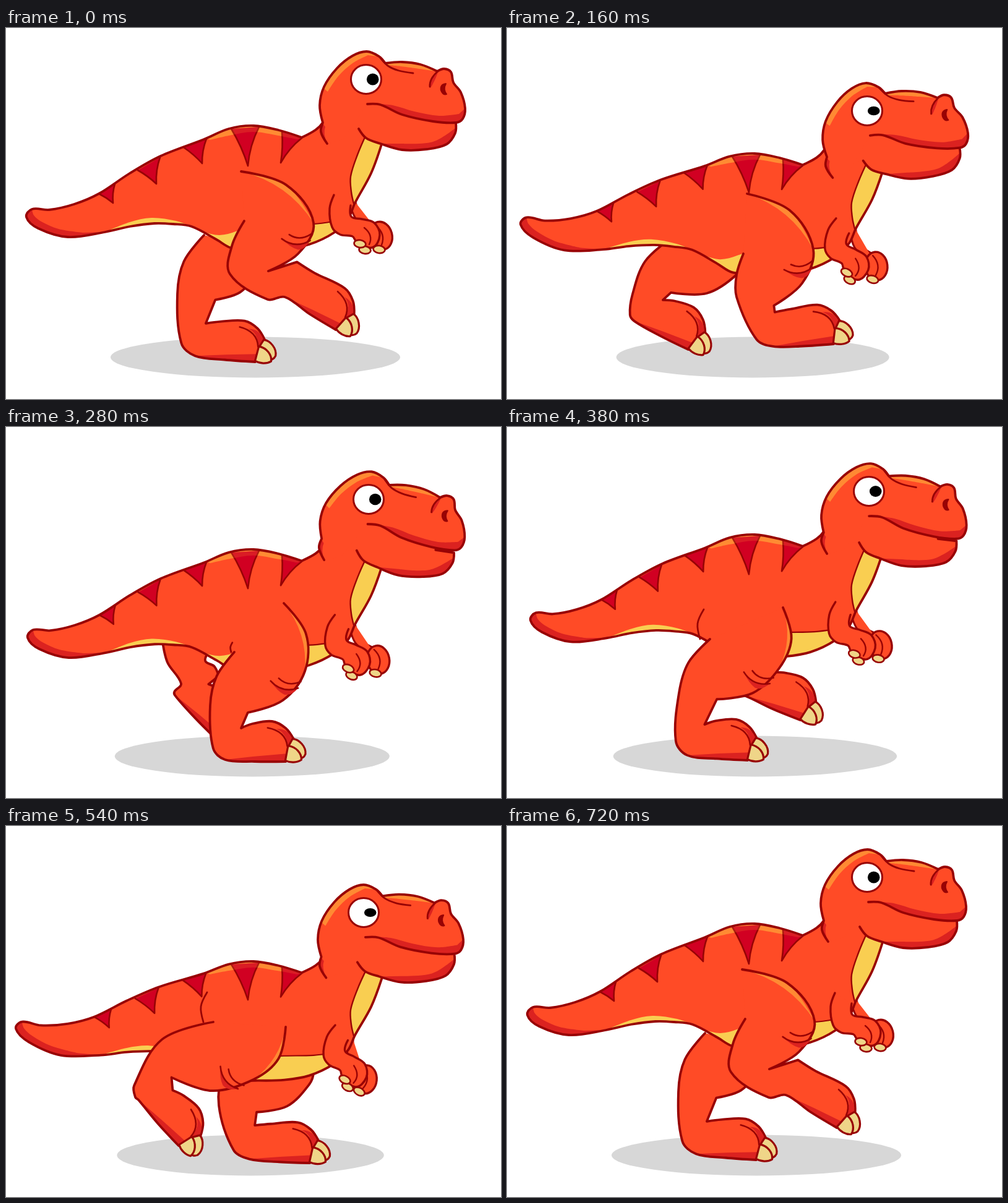
Animation, 800 px wide and 600 px high, one loop 740 ms. Source, as an HTML page with a canvas:

```html
<!DOCTYPE html>
<html lang="en">
<head>
<meta charset="utf-8">
<title>Running dinosaur</title>
<style>
html, body { margin: 0; width: 100%; height: 100%; overflow: hidden; background: #fff; }
canvas { display: block; width: 800px; height: 600px; }
</style>
</head>
<body>
<canvas id="stage" width="800" height="600"></canvas>
<script>
const ctx = document.getElementById('stage').getContext('2d');
const SKIN = '#ff4b26', LINE = '#980305', SHADE = '#db2220', GLOW = '#ff8a33',
      STRIPE = '#d10022', BELLY = '#f9ce51', CLAW = '#efd588';

// The run repeats every CYCLE ms and is shown in steps of STEP ms
const LOOP = 740, CYCLE = 720, STEP = 20;
const KEYS = [0, 160, 280, 380, 540, 620];

const nums = s => s.split(/[ ,]+/).map(Number);
const pts = s => s.split(' ').map(nums);
const rad = deg => deg * Math.PI / 180;
const clamp = (v, lo, hi) => Math.min(hi, Math.max(lo, v));
const add = ([x, y], dx, dy) => [x + dx, y + dy];
const dist = (a, b) => Math.hypot(b[0] - a[0], b[1] - a[1]);

// Point at part s of a-b, pushed sideways by k times its length
const bow = ([ax, ay], [bx, by], k, s = 0.5) =>
  [ax + (bx - ax) * s + (by - ay) * k, ay + (by - ay) * s - (bx - ax) * k];

// Body y, tail x y, head x y angle, near and far arm angle
const RIG = ['0 0 0 0 0 0 0 0', '45 -11 -33 0 51 -4 17 8', '40 2 -5 4 34 5 14 4',
  '16 5 -9 3 21 2.7 8 2', '61 -17 -39 -4 57 -1.3 18 20', '50 -13 -15 0 54 3.1 20 14'].map(nums);

// Thigh front, knee, ball of the foot, foot angle, hock, back of the thigh
const NEAR = [
  '380,232 497,315 533,488 31 362,398 385,312',
  '388,268 495,358 528,511 -4 371,435 382,365',
  '449,285 483,395 452,541 0 330,450 369,364',
  '446,292 440,390 389,539 3 278,430 328,343',
  '452,325 400,410 279,517 47 207,420 335,317',
  '418,292 405,396 289,492 54 231,395 335,308'
].map(nums);

// The same from the knee on
const FAR = [
  '405,395 403,540 4 277,430 320,335',
  '372,398 293,520 26 203,430 265,340',
  '322,378 340,505 45 283,415 252,340',
  '425,380 474,474 22 350,410 370,350',
  '490,418 491,545 2 344,452 385,350',
  '450,404 446,540 1 330,450 330,345'
].map(nums);

function at(rows, t) {
  const n = KEYS.length;
  const time = i => KEYS[(i + n) % n] + CYCLE * Math.floor(i / n);
  const row = i => rows[(i + n) % n];
  let i = n - 1;
  while (KEYS[i] > t) i--;
  const [t0, t1, t2, t3] = [i - 1, i, i + 1, i + 2].map(time);
  const [a, b, c, d] = [i - 1, i, i + 1, i + 2].map(row);
  const h = t2 - t1, s = (t - t1) / h, q = s * s, k = q * s, soft = 0.7;
  return b.map((v, j) => {
    const m1 = soft * h * (c[j] - a[j]) / (t2 - t0);
    const m2 = soft * h * (d[j] - v) / (t3 - t1);
    return (2 * k - 3 * q + 1) * v + (k - 2 * q + s) * m1 + (3 * q - 2 * k) * c[j] + (k - q) * m2;
  });
}

// Smooth line through points; corners stay sharp
function curve(p, corners = [], path = new Path2D(), join = false) {
  const dir = p.map((_, i) => {
    if (!i || i === p.length - 1 || corners.includes(i)) return [0, 0];
    const x = p[i + 1][0] - p[i - 1][0], y = p[i + 1][1] - p[i - 1][1], l = Math.hypot(x, y) || 1;
    return [x / l, y / l];
  });
  path[join ? 'lineTo' : 'moveTo'](...p[0]);
  for (let i = 1; i < p.length; i++) {
    const [x0, y0] = p[i - 1], [x1, y1] = p[i], l = dist(p[i - 1], p[i]) / 3;
    path.bezierCurveTo(x0 + dir[i - 1][0] * l, y0 + dir[i - 1][1] * l,
                       x1 - dir[i][0] * l, y1 - dir[i][1] * l, x1, y1);
  }
  return path;
}

function paint(path, fill, width = 0, color = LINE) {
  if (fill) { ctx.fillStyle = fill; ctx.fill(path); }
  if (width) { ctx.lineWidth = width; ctx.strokeStyle = color; ctx.stroke(path); }
}

const patch = (a, b, fill) => paint(curve(b, [], curve(a), true), fill);

function oval(x, y, rx, ry, angle, fill, width) {
  const p = new Path2D();
  p.ellipse(x, y, rx, ry, angle, 0, 7);
  paint(p, fill, width);
}

function local(x, y, angle, draw) {
  ctx.save();
  ctx.translate(x, y);
  ctx.rotate(angle);
  draw();
  ctx.restore();
}

const TOE_SHADE = new Path2D('M-32-6Q-14-6-6 14L-1 2Q-14-14-32-6Z');
const TOE_LINE = new Path2D('M-46-3Q-17-8-6 14');
const CLAW_TOP = new Path2D('M-2 0C8-3 23 4 26 16C26 22 22 26 18 26C12 20 6 16-4 13Z');
const CLAW_LOW = new Path2D('M-5 13C8 10 20 17 23 27C18 34 8 38-1 37Z');
const KNEE_SHADE = new Path2D('M-24 0Q-2 16 22 2Q14 17 2 17Q-10 14-24 0Z');
const KNEE_LINES = new Path2D('M-12-7Q5 4 24-9M-24 0Q-2 16 22 2');

function leg([sx, sy, kx, ky, bx, by, deg, hx, hy, ex, ey], near) {
  const top = [sx, sy], knee = [kx, ky], ball = [bx, by], hock = [hx, hy], end = [ex, ey];
  const c = Math.cos(rad(deg)), s = Math.sin(rad(deg));
  const foot = (x, y) => [bx + x * c - y * s, by + x * s + y * c];

  // The foot is rigid; a long reach only pulls out the instep
  const pull = Math.max(0, dist(hock, ball) - 155);
  const bend = rad(11 - deg / 2);
  const crook = add(hock, 62 * Math.cos(bend), 62 * Math.sin(bend));
  const toe = foot(13, -36), sole = foot(-50, 0), heel = foot(-98, -3);
  const front = [top, bow(top, knee, 0.17), knee];
  const outline = curve([
    ...front, bow(knee, crook, 0.15), crook,
    foot(-72 - pull, -54 - pull * 0.2), foot(-54 - pull * 0.6, -61), foot(-22, -65), foot(0, -54),
    toe, ball, sole, heel, bow(heel, hock, 0.15, 0.25), hock,
    bow(hock, end, dist(hock, end) / 900), end
  ], [4, 5, 9, 10]);

  paint(outline, SKIN);
  const under = curve([heel, sole, ball]);
  under.lineTo(...foot(4, -13));
  under.quadraticCurveTo(...foot(-48, -9), ...heel);
  paint(under, SHADE);
  if (near) {
    const glow = curve(front);
    glow.quadraticCurveTo(...bow(top, knee, 0.2), ...top);
    paint(glow, GLOW);
  }
  paint(outline, null, 3.8);

  local(...toe, rad(deg + 20), () => {
    paint(TOE_SHADE, SHADE);
    paint(TOE_LINE, null, 2.6);
    paint(CLAW_TOP, CLAW, 3.2);
    paint(CLAW_LOW, CLAW, 3.2);
  });
  if (!near) return;

  const turn = (Math.atan2(crook[1] - ky, crook[0] - kx) + 2 * Math.PI) % (2 * Math.PI) - rad(132);
  const out = turn + rad(135);
  local(kx + 38 * Math.cos(out), ky + 38 * Math.sin(out), turn, () => {
    paint(KNEE_SHADE, SHADE);
    paint(KNEE_LINES, null, 2.6);
  });
  // Fold over the hip, growing as the thigh swings back
  const w = clamp((385 - ex) / 50, 0, 1);
  if (w > 0.1) paint(curve([[-16, 0], [-20, -25], [-10, -48]].map(([x, y]) => add(end, x * w, y * w))), null, 2.8);
}

const BODY = pts('520,135 512,153 500,165 478,177 440,165 400,158 360,163 320,180 250,207 200,235 150,268 110,285 70,294 42,293 33,306 52,324 100,338 160,330 200,321 240,316 270,317 300,321 340,342 365,356 410,358 450,357 490,350 530,331 553,308 564,283 590,235 607,188 612,165');
const BACK_GLOW = [pts('478,178 440,165 400,158 360,163 325,179'), pts('330,181 360,174 400,168 440,174 470,180')];
const TAIL_SHADE = [pts('42,293 33,306 52,324 100,338 160,330'), pts('125,331 85,325 57,313 45,303 42,293')];
const TAIL_BELLY = [pts('160,330 200,314 235,307 275,312 300,321'), pts('270,317 240,316 200,321 160,330')];
const BELLY_TOP = pts('300,322 345,335 400,320 450,318 497,317 529,313');
const BELLY_LOW = pts('545,318 530,331 490,350 450,357 410,358 365,356 340,342 300,321');
const CHEST = [pts('584,168 568,205 557,240 558,265 562,284'), pts('564,283 590,235 609,180')];
const STRIPES = ['150,268 173,283 176,252', '213,230 243,252 249,209', '287,193 317,219 324,179',
  '364,163 391,223 409,160', '446,168 444,218 478,178'].map(pts);

function body(dy, tx, ty) {
  // The tail sways more towards its tip, and the belly sinks less than the back
  const flex = list => list.map(([x, y]) => {
    const w = (Math.max(0, 390 - x) / 357) ** 2;
    const squash = 0.12 * clamp((y - 160) / 160, 0, 1) * (1 - w);
    return [x + tx * w, y + dy * (1 - squash) + ty * w];
  });
  const shape = curve(flex(BODY), [3]);
  const both = ([a, b], fill) => patch(flex(a), flex(b), fill);
  paint(shape, SKIN);
  both(TAIL_SHADE, SHADE);
  both(TAIL_BELLY, BELLY);
  both([BELLY_TOP, BELLY_LOW], BELLY);
  paint(curve(flex(BELLY_TOP.slice(2))), null, 2.2);
  both(CHEST, BELLY);
  paint(curve(flex(CHEST[0])), null, 2.4);
  both(BACK_GLOW, GLOW);
  STRIPES.forEach(s => {
    const [a, tip, b] = flex(s), p = new Path2D();
    p.moveTo(...a);
    p.quadraticCurveTo(...bow(a, tip, 0.06), ...tip);
    p.quadraticCurveTo(...bow(tip, b, 0.1), ...b);
    paint(p, STRIPE, 2.6);
  });
  ctx.globalAlpha = 0.2;
  both(BACK_GLOW, GLOW);
  ctx.globalAlpha = 1;
  paint(shape, null, 3.8);
}

const JAW = pts('697,151 727,153 726,170 712,188 680,196 640,197 605,187 582,178 570,163');
const JAW_FILL = curve([...pts('535,165 575,120 640,128 700,140'), ...JAW.slice(1)]);
const JAW_SHADE = [pts('726,162 724,174 712,188 680,196 640,197 605,187'), pts('640,187 690,184 726,162')];
const SKULL = pts('519,187 509,168 512,153 507,125 514,95 535,65 560,45 583,38 603,46 613,57 640,55 670,59 697,70 708,66 719,71 723,88 735,104 742,130 738,147 727,153 690,151 640,140 605,124 584,123');
const LIP = [pts('592,122 605,124 640,140 690,151 727,153 738,147 742,130'), pts('732,139 700,142 660,135 625,125 592,122')];
const SKULL_GLOW = [pts('514,98 535,65 560,45 583,38 601,46'), pts('585,44 560,57 537,78 520,103')];
const SNOUT_GLOW = [pts('613,57 640,55 670,59 695,70'), pts('668,66 638,62 616,60')];
const BROW = curve(pts('603,46 617,61 635,69 658,73'));
const NOSE_SHADE = new Path2D('M698 72Q681 86 686 97Q692 88 698 72Z');
const NOSE_LINE = new Path2D('M698 70Q684 82 685 95');
const NOSTRIL = new Path2D('M711 90Q701 91 703 101Q706 109 712 107Q706 99 711 90Z');
const NECK_SHADE = new Path2D('M511 153Q503 168 519 187Q512 170 516 160Z');

function head(dx, dy, deg, squint) {
  const ex = 582 + dx, ey = 83 + dy;
  local(ex, ey, rad(deg), () => {
    ctx.translate(-582, -83);
    local(0, clamp(deg * 1.3, 0, 4), 0, () => {
      paint(JAW_FILL, SKIN);
      patch(...JAW_SHADE, SHADE);
      paint(curve(JAW, [1]), null, 3.8);
    });
    const skull = curve(SKULL, [2, 9, 12]);
    const fill = new Path2D(skull);
    fill.lineTo(545, 180);
    paint(fill, SKIN);
    patch(...LIP, SHADE);
    patch(...SKULL_GLOW, GLOW);
    patch(...SNOUT_GLOW, GLOW);
    paint(NECK_SHADE, SHADE);
    paint(NOSE_SHADE, SHADE);
    paint(skull, null, 3.8);
    paint(BROW, null, 2.8);
    paint(NOSE_LINE, null, 2.8);
    paint(NOSTRIL, LINE, 2);
  });
  oval(ex, ey, 24.5, 23.5, 0, '#fff', 3);
  oval(ex + 10.7, ey, 9.8, 9.5 - squint, 0, '#000');
}

// Arms are rigid and swing about the shoulder
const ARM = curve(pts('530,270 523,292 527,322 540,334 560,337 566,345 592,355 604,335 595,315 575,309 558,305 557,287'));
const FINGER = new Path2D('M579 323Q594 335 587 350');
const FAR_LIMB = curve(pts('557,272 571,308 596,322'));
const FAR_FINGER = new Path2D('M598 320Q614 333 607 351');
const handClaw = (x, y) => oval(x, y, 9.5, 6, 0.15, CLAW, 2.6);

const swing = (dy, deg, draw) => local(540, 275 + dy * 0.9, rad(deg), () => {
  ctx.translate(-540, -275);
  draw();
});

function farArm() {
  paint(FAR_LIMB, null, 13);
  paint(FAR_LIMB, SKIN, 7, SKIN);
  oval(606, 336, 18, 23, -0.25, SKIN, 3.4);
  paint(FAR_FINGER, null, 2.4);
  handClaw(603, 358);
}

function nearArm() {
  paint(ARM, SKIN, 3.4);
  paint(FINGER, null, 2.4);
  handClaw(580, 359);
  handClaw(572, 349);
}

function draw(t) {
  const [dy, tx, ty, hx, hy, ha, arm, arm2] = at(RIG, t);
  const far = at(FAR, t);

  ctx.fillStyle = '#fff';
  ctx.fillRect(0, 0, 800, 600);
  oval(403 - dy * 0.13, 532.5, 234 - dy * 0.3, 33, 0, '#d7d7d7');
  leg([far[0], far[1] - 40, ...far], false);
  swing(dy, arm2, farArm);
  body(dy, tx, ty);
  head(hx, hy, ha, clamp(-ty * 0.065, 0, 3));
  leg(at(NEAR, t), true);
  swing(dy, arm, nearArm);
}

ctx.lineCap = ctx.lineJoin = 'round';

function tick(now) {
  draw(Math.floor((now % LOOP) / STEP) * STEP % CYCLE);
  requestAnimationFrame(tick);
}
draw(0);
requestAnimationFrame(tick);
</script>
</body>
</html>
```
